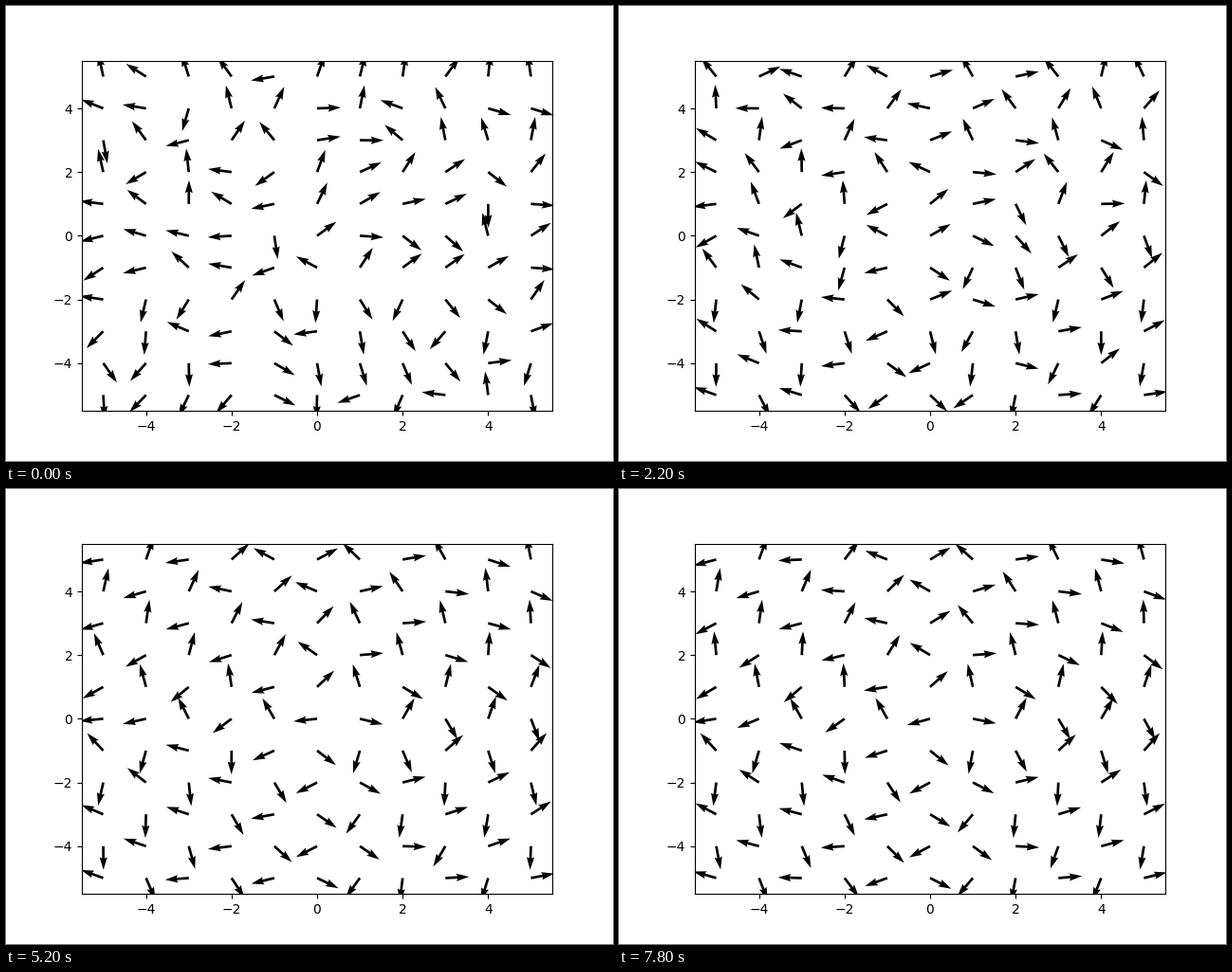
Write a matplotlib script that moves like this. It is 640 by 480 pixels and loops after 8 s.

```python
import numpy as np
import matplotlib.pyplot as plt
from matplotlib.animation import FuncAnimation

FRAMES = 40
STEP_MS = 200
TILT = np.radians(60)     # lean of each settled arrow from the outward direction
SPREAD = np.radians(65)   # scatter while an arrow is still wandering
JITTER = np.radians(14)   # scatter once it has locked in
CENTRES = (4j, -3 - 4j, 4 - 3j)  # order spreads from here

X, Y = np.meshgrid(np.arange(-5, 6), np.arange(-5, 6))
Z = X + 1j * Y
OUTWARD = Z / np.maximum(np.abs(Z), 1)


def neighbour_sum(a):
    p = np.pad(a, 1)
    return p[:-2, 1:-1] + p[2:, 1:-1] + p[1:-1, :-2] + p[1:-1, 2:]


def settled_headings():
    """Neighbours repel, a field pulls outward; two domains lean opposite ways."""
    lean = np.where((X + Y) % 2 == 0, 1, -1)
    lower = ((Y < 0) & (X < 2)) | ((Y == 0) & (X == -5))
    spins = OUTWARD * np.exp(1j * TILT * np.where(lower, -lean, lean))
    count = neighbour_sum(np.ones(X.shape))
    for _ in range(4):
        pull = OUTWARD - neighbour_sum(spins) / count
        spins = np.exp(1j * np.angle(spins + pull))
    return np.angle(spins)


def relax():
    """Headings for every step: arrows wander, then lock in as order spreads."""
    rng = np.random.default_rng(7)
    goal = settled_headings()
    dist = np.min([np.abs(Z - c) for c in CENTRES], axis=0)
    lock = (4 + 5.5 * dist) * rng.random(Z.shape) - 2

    poses = []
    for n in range(FRAMES):
        left = 1 - n / (FRAMES - 1)
        locked = n >= lock
        new = np.where(locked,
                       goal + rng.normal(0, JITTER * left, Z.shape),
                       np.angle(OUTWARD) + rng.normal(0, SPREAD, Z.shape))
        if poses:
            moves = (rng.random(Z.shape) < 0.33) | (locked & (n - 1 < lock))
            new = np.where(moves, new, poses[-1])
        poses.append(new)
    return np.array(poses)


headings = relax()

fig, ax = plt.subplots(figsize=(6.4, 4.8), dpi=100)
arrows = ax.quiver(X, Y, np.cos(headings[0]), np.sin(headings[0]))
ax.set_xlim(-5.5, 5.5)
ax.set_ylim(-5.5, 5.5)


def update(n):
    arrows.set_UVC(np.cos(headings[n]), np.sin(headings[n]))
    return arrows,


anim = FuncAnimation(fig, update, frames=FRAMES, interval=STEP_MS,
                     init_func=lambda: update(0), repeat=True, repeat_delay=0)
plt.show()
```
